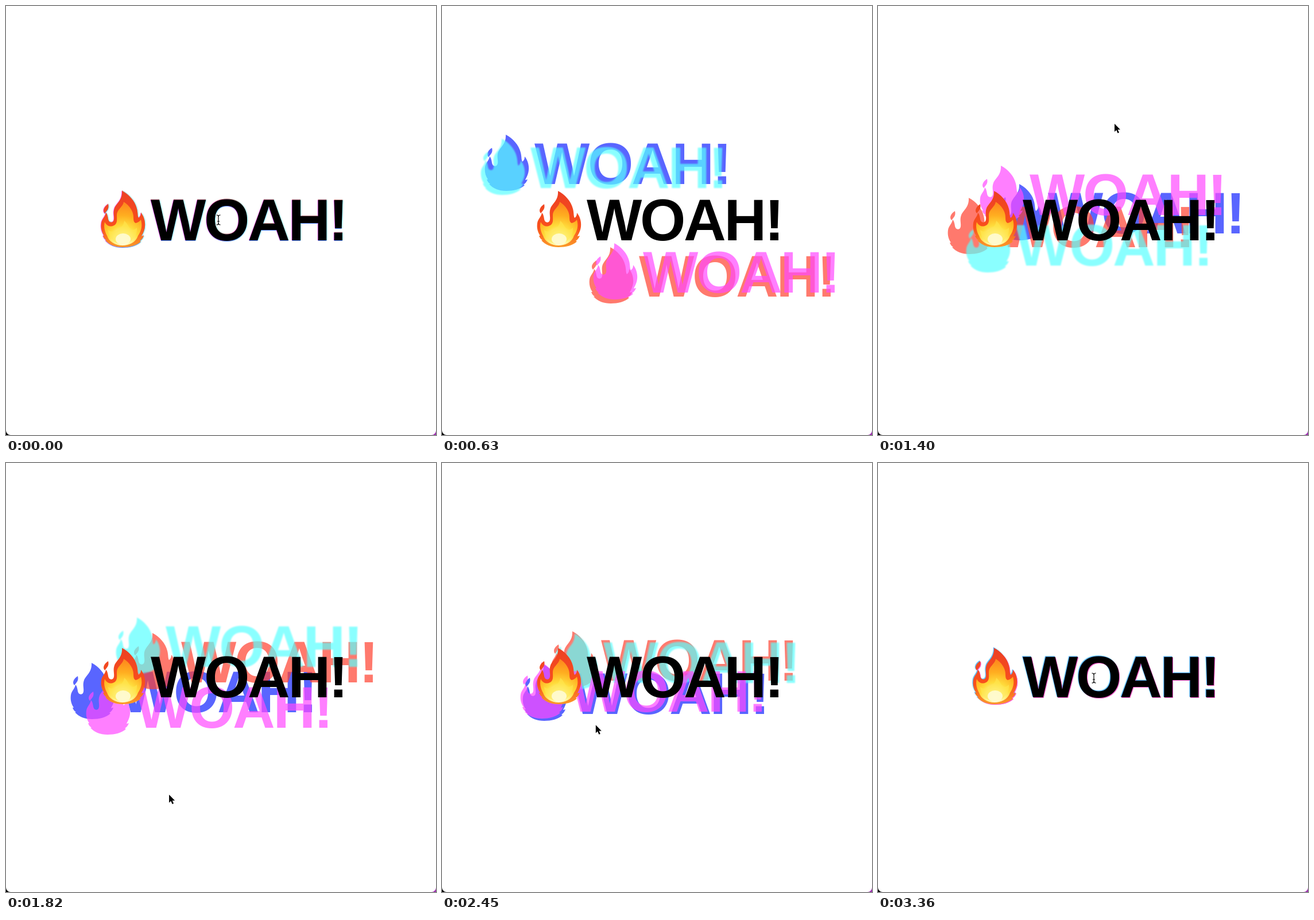
Write an HTML page that moves like this. It is 749 px wide and 747 px high and loops after 3.78 s.

```html
<!DOCTYPE html>
<html lang="en">
<head>
<meta charset="utf-8">
<title>Woah</title>
<style>
html, body { margin: 0; height: 100%; overflow: hidden; background: #fff; }
svg { display: block; width: 749px; height: 747px; }
text { font: bold 102px "Liberation Sans", Arial, sans-serif; letter-spacing: -3.25px; font-kerning: none; }
.shadow { opacity: .7; }
</style>
</head>
<body>
<svg viewBox="0 0 749 747">
  <defs>
    <path id="flame" d="M202 322C214 328 225 340 228 353C230 361 229 366 231 369C234 367 235 364 235 360C240 366 243 375 242 384C241 393 237 398 236 401L240 400C238 405 236 407 233 409L235 410C228 417 215 420 203 420C190 420 180 416 173 408L175 408C172 406 170 403 169 400L171 400C166 393 165 385 166 378C167 371 173 367 174 360C178 364 177 370 179 374C181 378 187 378 188 372C189 366 186 360 189 352C193 343 203 338 202 322ZM178 345C180 353 176 356 172 361C168 357 170 350 178 345Z"/>
    <g id="title"><use href="#flame"/><text x="252" y="408">WOAH!</text></g>
    <linearGradient id="outer" x2="0" y2="1">
      <stop stop-color="#ec4024"/><stop offset=".65" stop-color="#f9501c"/><stop offset="1" stop-color="#fb9b28"/>
    </linearGradient>
    <radialGradient id="inner" gradientUnits="userSpaceOnUse" cx="204" cy="409" r="74">
      <stop stop-color="#fffde8"/><stop offset=".16" stop-color="#fff9a8"/><stop offset=".36" stop-color="#ffdc3c"/>
      <stop offset=".6" stop-color="#ffae20"/><stop offset="1" stop-color="#fd7a1c"/>
    </radialGradient>
  </defs>

  <use class="shadow" href="#title" fill="#1324ff"/>
  <use class="shadow" href="#title" fill="#ff4130"/>
  <use class="shadow" href="#title" fill="#5affff" style="filter: blur(.8px)"/>
  <use class="shadow" href="#title" fill="#ff49ff"/>

  <use href="#flame" fill="url(#outer)"/>
  <path fill="url(#inner)" d="M205 341C216 348 222 358 222 368C222 374 223 377 226 378C230 377 233 375 235 372C238 383 236 391 230 400C226 412 214 417 203 417C190 417 179 410 176 400C171 391 170 383 172 376C175 382 180 385 186 383C195 380 193 372 193 364C193 354 204 350 205 341Z"/>
  <path fill="#ffe850" opacity=".6" d="M206 374C213 380 214 387 219 390C223 390 226 388 228 386C229 400 218 415 203 415C188 415 179 402 178 390C184 394 190 394 195 390C201 386 205 381 206 374Z"/>
  <ellipse cx="204" cy="406" rx="13" ry="10" fill="#fffce0" opacity=".8"/>
  <text x="252" y="408">WOAH!</text>

  <path id="arrow" d="M0 0V14L3.2 11L5.6 16.4L8 15.3L5.6 10.2H10Z" stroke="#fff" paint-order="stroke"/>
  <g id="beam" fill="none" stroke-linecap="square">
    <path id="bar" d="M-3 -8Q0 -8 0 -5Q0 -8 3 -8M0 -5V6M-3 9Q0 9 0 6Q0 9 3 9M-1.5 3H1.5" stroke="#fff" stroke-width="3"/>
    <path d="M-3 -8Q0 -8 0 -5Q0 -8 3 -8M0 -5V6M-3 9Q0 9 0 6Q0 9 3 9M-1.5 3H1.5" stroke="#000" stroke-width="1.2"/>
  </g>
  <path d="M0 739A8 8 0 0 0 8 747H0Z"/>
  <path d="M749 739A8 8 0 0 1 741 747H749Z" fill="#9b2fae"/>
</svg>
<script>
const LOOP = 3780, STEP = 70, LAG = 8, WALK = 200;
// pointer path: time, x, y
const path = [
  [0, 370, 372], [140, 385, 378], [280, 450, 440], [420, 590, 570], [560, 725, 700],
  [630, 733, 713], [700, 640, 690], [840, 360, 440], [910, 270, 370], [980, 250, 430],
  [1050, 288, 567], [1120, 350, 640], [1190, 450, 600], [1260, 510, 450], [1330, 465, 240],
  [1400, 412, 205], [1470, 350, 215], [1610, 215, 340], [1750, 230, 520], [1890, 350, 610],
  [2030, 460, 590], [2100, 400, 612], [2170, 327, 633], [2240, 265, 630], [2380, 240, 520],
  [2520, 310, 400], [2660, 400, 350], [2730, 421, 349], [2800, 424, 347], [2940, 415, 360],
  [3150, 390, 370], [3360, 376, 374], [3780, 376, 374]
];
const shadows = document.querySelectorAll('.shadow');
const arrow = document.getElementById('arrow');
const beam = document.getElementById('beam');

function slope(i, axis) {
  const a = path[i - 1], b = path[i + 1];
  return a && b && path[i][0] < 3360 ? (b[axis] - a[axis]) / (b[0] - a[0]) : 0;
}

// cubic Hermite curve through the path points
function pointer(t) {
  const i = Math.max(0, path.findIndex(p => p[0] > t) - 1);
  const a = path[i], b = path[i + 1], d = b[0] - a[0], u = Math.max(0, t - a[0]) / d;
  const s = u * u * (3 - 2 * u);
  return [1, 2].map(k => a[k] + (b[k] - a[k]) * s
    + d * u * (1 - u) * ((1 - u) * slope(i, k) - u * slope(i + 1, k)));
}

function place(el, x, y) {
  el.setAttribute('transform', `translate(${x} ${y})`);
}

function show(el, on) {
  el.setAttribute('visibility', on ? 'visible' : 'hidden');
}

function draw(now) {
  const t = Math.floor(now % LOOP / STEP) * STEP;
  const [mx, my] = pointer(t);
  const [x, y] = pointer(t - LAG).map(v => Math.round((v - 372) * WALK / 748));
  [[-y, -x], [y, x], [-x, -y], [x, y]].forEach((p, i) => place(shadows[i], ...p));

  const overText = mx > 166 && mx < 592 && my > 315 && my < 430;
  place(arrow, mx, my);
  place(beam, mx, my);
  show(arrow, !overText && mx < 700);
  show(beam, overText);
  requestAnimationFrame(draw);
}
requestAnimationFrame(draw);
</script>
</body>
</html>
```
